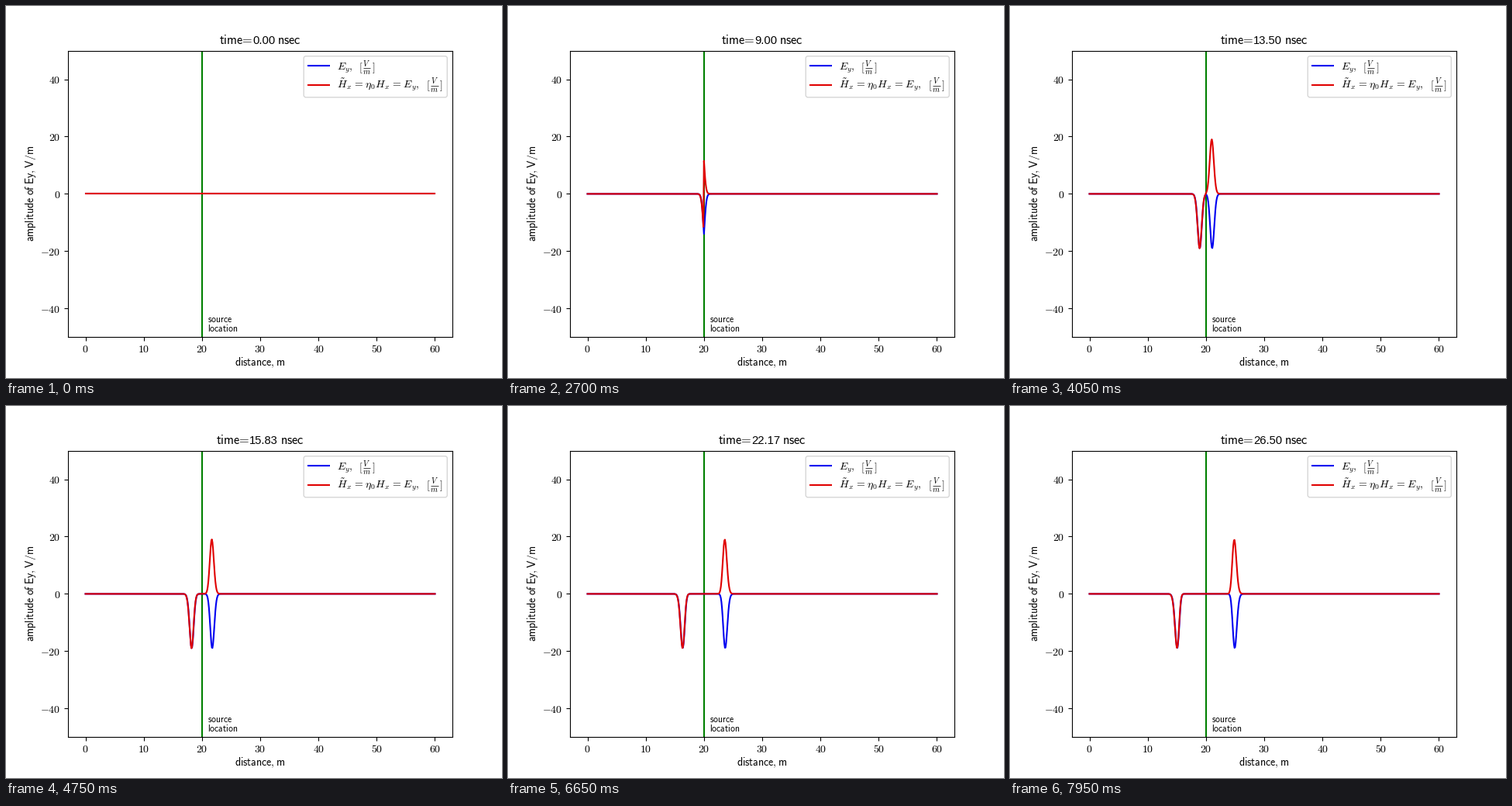
Write a matplotlib script that moves like this. It is 640 by 480 pixels and loops after 8 s.

```python
import numpy as np
import matplotlib.pyplot as plt
from matplotlib.animation import FuncAnimation
from matplotlib.patches import FancyBboxPatch

plt.rcParams["mathtext.fontset"] = "cm"

W, H, DPI = 640, 480, 100
FRAMES, INTERVAL = 160, 50
CELLS, DX = 601, 0.1
STEPS_PER_NS = 6
SRC = 200
ETA = 376.73
BLUE, RED = "#0000f0", "#e00000"


def sans(text):
    """Plain text set in Computer Modern Sans with text-mode spacing."""
    for old, new in ((" ", r"\hspace{0.25}"), (",", "{,}"),
                     ("=", r"\hspace{-0.2}=\hspace{-0.2}")):
        text = text.replace(old, new)
    return rf"$\mathsf{{{text}}}$"


def simulate():
    """1D FDTD at Courant number 0.5 with a Gaussian current sheet."""
    e, h = np.zeros(CELLS), np.zeros(CELLS)
    history = [(e.copy(), h.copy())]
    for n in range(1, FRAMES):
        h[:-1] += 0.5 * (e[1:] - e[:-1])
        e[1:] += 0.5 * (h[1:] - h[:-1])
        e[SRC] -= 0.5 * ETA * DX * np.exp(-((n - 60) / 10) ** 2)
        history.append((e.copy(), h.copy()))
    return history


fields = simulate()
x = np.arange(CELLS) * DX

fig, ax = plt.subplots(figsize=(W / DPI, H / DPI), dpi=DPI)
ax.set(xlim=(-3, 63), ylim=(-50, 50))
xt, yt = range(0, 61, 10), range(-40, 41, 20)
ax.set_xticks(xt, [f"${v}$" for v in xt])
ax.set_yticks(yt, [f"${{{v}}}$" for v in yt])
ax.tick_params(axis="x", pad=3)

ax.axvline(SRC * DX, color="g")
e_line, = ax.plot(x, fields[0][0], color=BLUE)
h_line, = ax.plot(x, fields[0][1], color=RED)


# Labels and legend are laid out in pixels from the top left
def label(px, py, text, size=10, **style):
    return fig.text(px / W, 1 - py / H, text, fontsize=size, va="baseline",
                    **style)


def rule(x0, x1, py, color, width):
    fig.add_artist(plt.Line2D([x0 / W, x1 / W], [1 - py / H] * 2,
                              color=color, lw=width, solid_capstyle="butt"))


def unit(px, py):
    """The bracketed fraction V over m."""
    label(px, py, "$[$")
    label(px + 10.4, py - 5.5, "$V$", 7.4, ha="center")
    rule(px + 5.5, px + 15.3, py - 3.5, "k", 0.5)
    label(px + 10.4, py + 4.8, "$m$", 7.4, ha="center")
    label(px + 17, py, "$]$")


label(328, 464, sans("distance, m"), ha="center")
label(36, 242.4, sans("amplitude of Ey, V/m"), ha="center", rotation=90,
      rotation_mode="anchor")
label(260.5, 408.4, sans("source"), 8.4)
label(260.5, 420.4, sans("location"), 8.4)

fig.add_artist(FancyBboxPatch(
    (387, H - 115), 179.5, 47.5, boxstyle="round,pad=2.8,rounding_size=2.8",
    transform=None, fc="white", ec="0.8", lw=1, alpha=0.8))
rule(388.6, 418.4, 77, BLUE, 1.5)
rule(388.6, 418.4, 102, RED, 1.5)
eq = r"\hspace{0.11}=\hspace{0.11}"
label(427.2, 83, "$E_y{,}$")
unit(455, 83)
label(427.2, 106, rf"$\tilde{{H}}_x{eq}\eta_0 H_x{eq}E_y{{,}}$")
unit(542.4, 106)

# Title: fixed words around a sans-serif counter
WORD, DIGIT, DOT, TAIL = 42.8, 8.17, 4.1, 34.4
TITLE_Y = 49
word = label(0, TITLE_Y, sans("time="), 11.75)
count = label(0, TITLE_Y, "", 10.6, family="Liberation Sans")
tail = label(0, TITLE_Y, sans("nsec"), 11.75, ha="right")


def set_title(value):
    text = f"{value:.2f}"
    middle = (len(text) - 1) * DIGIT + DOT
    left = 328 - (WORD + middle + TAIL) / 2
    count.set_text(text)
    word.set_x(left / W)
    count.set_x((left + WORD) / W)
    tail.set_x((left + WORD + middle + TAIL) / W)


def update(n):
    e, h = fields[n]
    e_line.set_ydata(e)
    h_line.set_ydata(h)
    set_title(n / STEPS_PER_NS)
    return e_line, h_line, word, count, tail


anim = FuncAnimation(fig, update, frames=FRAMES, interval=INTERVAL,
                     repeat=True, repeat_delay=0)
plt.show()
```
